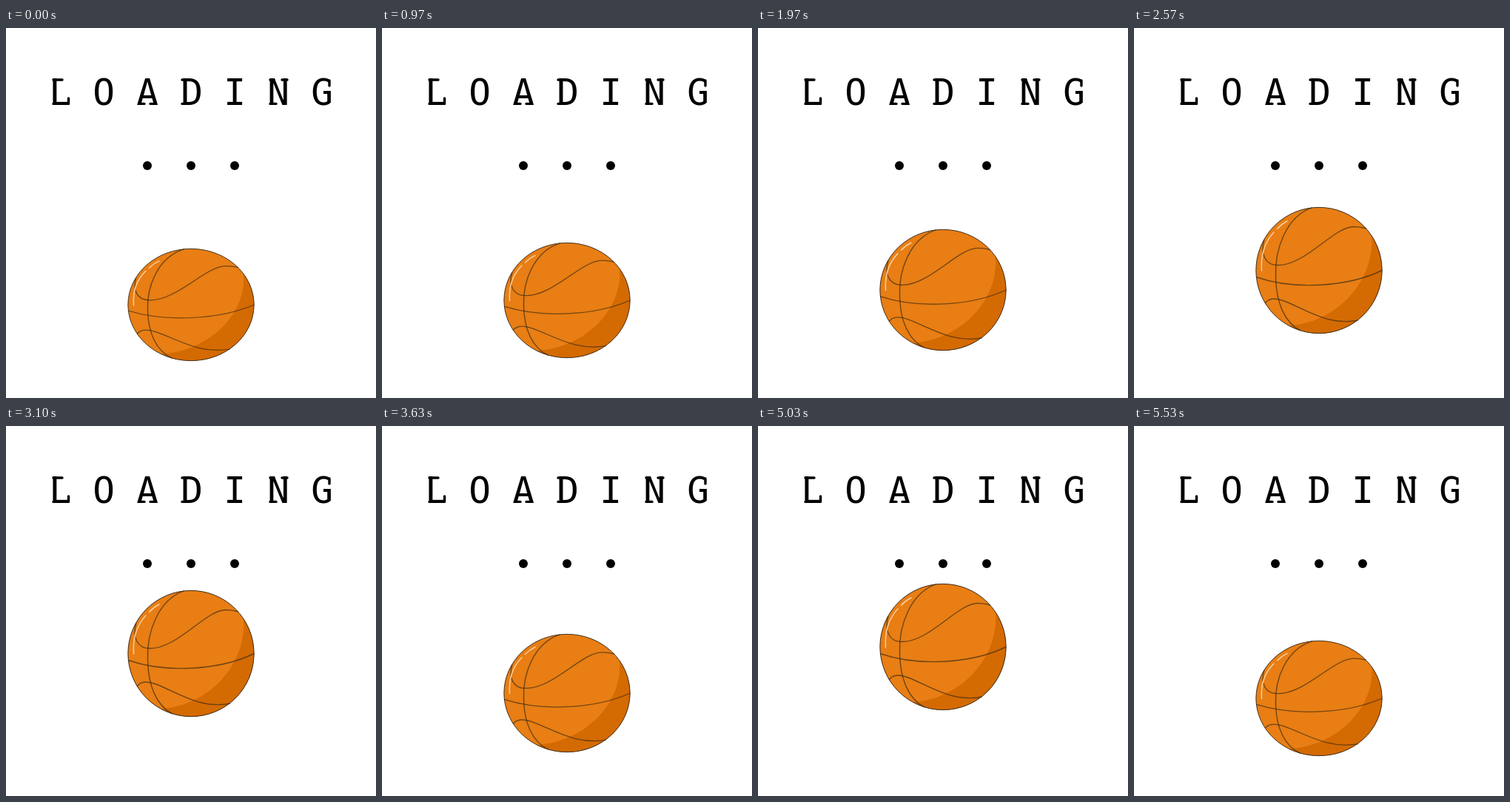
These frames come from a looping animation (500 by 500 pixels, 5560 ms). An HTML page:

```html
<!DOCTYPE html>
<html lang="en">
<head>
<meta charset="utf-8">
<title>Loading</title>
<style>
  html, body { margin: 0; width: 100%; height: 100%; overflow: hidden; background: #fff; }
  svg { display: block; width: 100%; height: 100%; }
  text { font: 49.4px "DejaVu Sans Mono", "Liberation Mono", monospace; text-anchor: middle; }
  .serifs { fill: none; stroke: #000; stroke-width: 3.4; stroke-linecap: round; }
  .seams { fill: none; stroke: #3a2a12; stroke-opacity: .68; stroke-width: 1.4; }
  .shine { fill: none; stroke: #f9cb98; stroke-width: 1.6; stroke-linecap: round; }
</style>
</head>
<body>
<svg viewBox="0 0 500 500">
  <text x="73 132 191 251 309 368 427" y="104">LOADING</text>
  <path class="serifs" d="M64 70H76 M64 102.4H68 M84.5 95V102
    M180 102.4H187 M195 102.4H202
    M238 70H243 M238 102.4H243
    M357 70H362 M373 70H380 M357 102.4H365
    M437 71V78"/>
  <g>
    <circle cx="191" cy="186" r="6"/>
    <circle cx="250" cy="186" r="6"/>
    <circle cx="309" cy="186" r="6"/>
  </g>

  <g id="ball">
    <circle cx="250" cy="327.5" r="85.3" fill="#e87e14"/>
    <path fill="#d46a02" d="M321 280.2C326 340 276 398 209 402.3A85.3 85.3 0 0 0 321 280.2Z"/>
    <g class="seams">
      <path d="M165 336.5C215 354 288 350.5 335.2 327.5"/>
      <path d="M241 242.7C205 255 190 300 191.5 336C192 370 203 398 225 409"/>
      <path d="M176 286C170 306 178 320.5 194 320.5C231 321.5 270 268.5 297 268.5Q306 268.5 314 271"/>
      <path d="M177 372C183 364 192 365 203 369C232 380 262 403 303 395"/>
    </g>
    <path class="shine" d="M172.5 328C171 306 177 289 189 276M193.5 271.5Q199 265 207 261"/>
    <circle cx="250" cy="327.5" r="85.1" fill="none" stroke="#3b3024" stroke-width="1"/>
  </g>
</svg>
<script>
  const LOOP = 5560, FPS = 30, STEPS = 28;
  const SIZE = 171, REST = 327.5;
  // Upper edge of the ball, from the peak of the bounce down to the floor.
  const tops = [210, 211.5, 213, 216.5, 222, 227, 234, 242, 250, 260, 272, 281, 290, 298];
  const ball = document.getElementById("ball");

  function draw(now) {
    const step = Math.floor((now % LOOP + 3.4) * FPS / 1000) % STEPS;
    const fall = Math.floor(Math.abs(step - 13.5));
    // The ball flattens during the last few steps before the floor.
    const height = Math.min(SIZE, 204 - 4 * (fall - tops.length + 14));
    const center = tops[fall] + height / 2;
    ball.setAttribute("transform",
      `translate(0 ${center}) scale(1 ${height / SIZE}) translate(0 ${-REST})`);
  }

  function tick() {
    draw(performance.now());
    requestAnimationFrame(tick);
  }
  tick();
</script>
</body>
</html>
```
